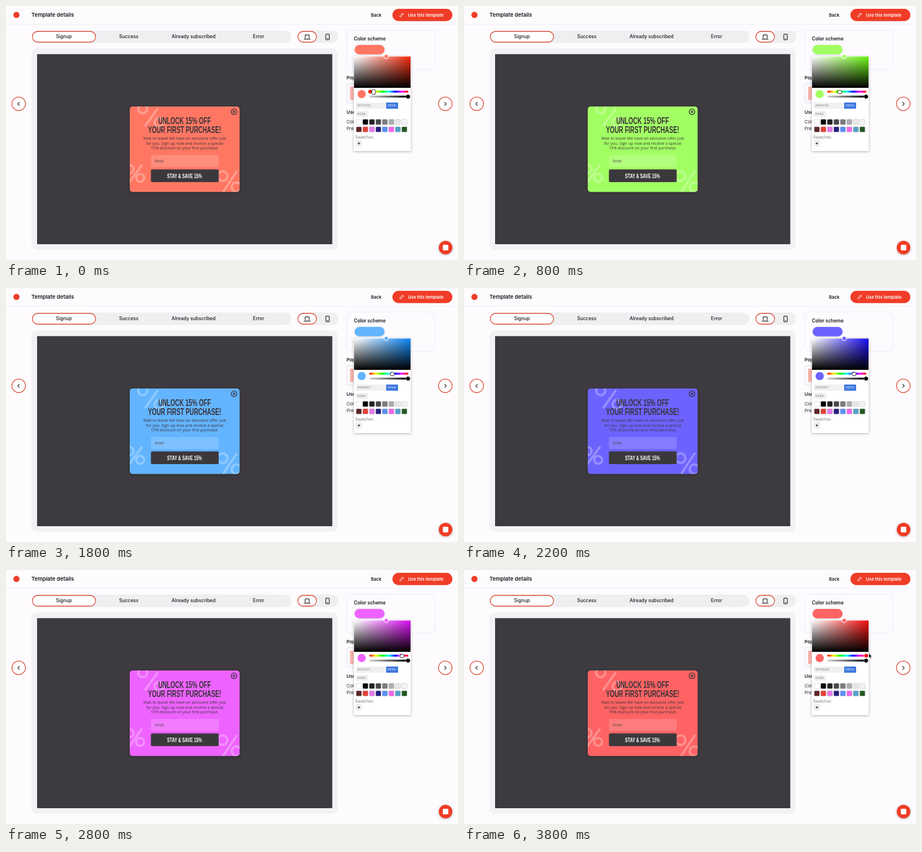
An HTML page for the animation above (3.9 s loop, 800 by 450 pixels).

```html
<!DOCTYPE html>
<html lang="en">
<head>
<meta charset="utf-8">
<title>Template details</title>
<style>
  html, body { margin: 0; width: 100%; height: 100%; overflow: hidden; background: #fdfbfe; }
  svg { display: block; width: 800px; height: 450px; font-family: Inter, sans-serif; --h: 7.4; }
  .tint { fill: hsl(var(--h) 100% 69.5%); }
  .hue { fill: hsl(var(--h) 100% 50%); }
  .hue-stop { stop-color: hsl(var(--h) 90% 50%); }
  .bold { font-weight: 600; fill: #17161a; }
  .tabs { font-size: 8.4px; font-weight: 500; fill: #1b1a1e; text-anchor: middle; }
  .ring { fill: #fff; stroke: #dc4c38; stroke-width: 1.3; }
  .line { fill: none; stroke: #222; stroke-width: 1.2; stroke-linecap: round; stroke-linejoin: round; }
  .condensed { font: bold 16px "Liberation Sans", sans-serif; text-anchor: middle; fill: #373238; }
  .copy { font: 500 7.05px "Open Sans", sans-serif; text-anchor: middle; fill: #3c343a; }
  .tiny { font-size: 4.8px; letter-spacing: .4px; fill: #77757b; }
  .percent { fill: none; stroke: #fff; stroke-opacity: .28; stroke-width: 4; }
  .soft { filter: drop-shadow(0 1px 2px rgba(0, 0, 0, .3)); }
</style>
</head>
<body>
<svg id="stage" viewBox="0 0 800 450">
  <defs>
    <linearGradient id="sat">
      <stop stop-color="#fff"/><stop offset="1" class="hue-stop"/>
    </linearGradient>
    <linearGradient id="dark" x2="0" y2="1">
      <stop stop-color="#000" stop-opacity="0"/><stop offset="1" stop-color="#000"/>
    </linearGradient>
    <linearGradient id="rainbow">
      <stop stop-color="#f00"/><stop offset=".1667" stop-color="#ff0"/>
      <stop offset=".3333" stop-color="#0f0"/><stop offset=".5" stop-color="#0ff"/>
      <stop offset=".6667" stop-color="#00f"/><stop offset=".8333" stop-color="#f0f"/>
      <stop offset="1" stop-color="#f00"/>
    </linearGradient>
    <linearGradient id="alpha">
      <stop stop-color="#d5d5d5"/><stop offset="1" stop-color="#000"/>
    </linearGradient>
    <clipPath id="card"><rect x="219" y="178" width="194.5" height="151.5" rx="5"/></clipPath>
  </defs>

  <rect width="800" height="450" fill="#fdfbfe"/>

  <!-- header -->
  <path d="M0 32.5H800" stroke="#f0eef2"/>
  <circle cx="18.5" cy="15.8" r="5.5" fill="#ef3d2a"/>
  <text class="bold" x="45" y="19.2" font-size="9.5">Template details</text>
  <text class="bold" x="646" y="18.7" font-size="7.7">Back</text>
  <rect x="684" y="5" width="106" height="21.7" rx="10.8" fill="#f03c26"/>
  <path d="M697 19.2l.5-2.2 4.6-4.6 1.7 1.7-4.6 4.6zM701 13.5l1.7 1.7" fill="none" stroke="#fff" stroke-width=".9" stroke-linejoin="round"/>
  <text x="711.5" y="18.6" font-size="7.5" font-weight="600" fill="#fff">Use this template</text>

  <!-- tabs -->
  <g fill="#eeeff1">
    <rect x="46" y="43.5" width="459" height="22" rx="11"/>
    <rect x="516" y="43.5" width="72" height="22" rx="11"/>
  </g>
  <rect class="ring" x="46.6" y="45" width="112" height="19" rx="9.5"/>
  <rect class="ring" x="516.6" y="45" width="33" height="19" rx="9.5"/>
  <g class="tabs">
    <text x="102.5" y="57.4">Signup</text>
    <text x="217.3" y="57.4">Success</text>
    <text x="332" y="57.4">Already subscribed</text>
    <text x="447" y="57.4">Error</text>
  </g>
  <path class="line" d="M529.5 57v-5q0-.8.8-.8h5.4q.8 0 .8.8v5M527.8 58.7h10.4"/>
  <rect class="line" x="566" y="49.8" width="6.2" height="10.2" rx="1.4"/>
  <path class="line" d="M568.5 57.9h1.2"/>

  <!-- preview -->
  <rect x="45" y="75" width="542" height="357" rx="10" fill="#f2f1f4"/>
  <rect x="55" y="85.3" width="522.5" height="336.7" fill="#3d3b3f"/>
  <rect class="tint soft" x="219" y="178" width="194.5" height="151.5" rx="5"/>
  <g class="percent" clip-path="url(#card)">
    <path d="M269 181L246 213M241 281L217 314M409 292L384 330"/>
    <circle cx="242" cy="182" r="8"/><circle cx="271" cy="206" r="8"/>
    <circle cx="219" cy="289" r="7"/><circle cx="237.5" cy="304.5" r="7"/>
    <circle cx="383.5" cy="301.5" r="8.5"/><circle cx="408" cy="321" r="8.5"/>
  </g>
  <g fill="none" stroke="#37333a" stroke-width="1.3" stroke-linecap="round">
    <circle cx="403.6" cy="187.4" r="5"/>
    <path d="M401.9 185.7l3.4 3.4m0-3.4l-3.4 3.4"/>
  </g>
  <g class="condensed">
    <g transform="translate(316 0) scale(.66 1)">
      <text y="209">UNLOCK 15% OFF</text>
      <text y="224.7">YOUR FIRST PURCHASE!</text>
    </g>
  </g>
  <g class="copy">
    <text x="316.3" y="237.3">Wait to leave! We have an exclusive offer just</text>
    <text x="316.3" y="245.7">for you. Sign up now and receive a special</text>
    <text x="316.3" y="254.1">15% discount on your first purchase.</text>
  </g>
  <rect x="256.5" y="264" width="120" height="21.5" rx="2" fill="#fff" fill-opacity=".16"/>
  <text x="263.2" y="277" style="font:6.2px 'Open Sans',sans-serif" fill="#4a4048">Email</text>
  <rect x="256.5" y="289.5" width="120" height="22.5" rx="2.5" fill="#3b383c"/>
  <g class="condensed" transform="translate(316 304.6) scale(.66 1)">
    <text style="font-size:10.8px;fill:#fff">STAY &amp; SAVE 15%</text>
  </g>

  <!-- navigation -->
  <circle class="ring" cx="22.5" cy="173.3" r="12"/>
  <path class="line" d="M23.7 170.4l-2.9 2.9 2.9 2.9"/>
  <circle class="ring" cx="777.5" cy="173.3" r="12"/>
  <path class="line" d="M776.3 170.4l2.9 2.9-2.9 2.9"/>
  <circle class="soft" cx="778" cy="428" r="12" fill="#f03c26"/>
  <rect x="773.2" y="423" width="9.6" height="10" rx="1.6" fill="#fff"/>

  <!-- side panel -->
  <rect x="603" y="42.5" width="156.5" height="69.5" rx="9" fill="none" stroke="#eeecf1"/>
  <text class="bold" x="615.8" y="61" font-size="8.4">Color scheme</text>
  <rect x="616" y="68" width="55" height="18.5" rx="9.2" fill="#fff" stroke="#e4e2e7" stroke-width=".8"/>
  <rect class="tint" x="617" y="69" width="53" height="16.7" rx="8.3"/>
  <text class="bold" x="602.7" y="130.4" font-size="8.2">Popup type</text>
  <rect x="603" y="137.5" width="40" height="34.5" rx="3" fill="#faf8fb" stroke="#e3e1e6"/>
  <rect x="609" y="143" width="28" height="23.5" fill="#f7b3ab"/>
  <text class="bold" x="602.7" y="191.2" font-size="8.2">Use case</text>
  <g font-size="8" fill="#29272c">
    <text x="602.7" y="208">Color themes</text>
    <text x="602.7" y="220">Prevent exits</text>
  </g>

  <!-- picker -->
  <rect class="soft" x="615.5" y="89" width="101" height="168" rx="1" fill="#fff"/>
  <rect x="616" y="89.5" width="100" height="55.5" fill="url(#sat)"/>
  <rect x="616" y="89.5" width="100" height="55.5" fill="url(#dark)"/>
  <circle class="tint" cx="673" cy="89.5" r="3.8" stroke="#fff" stroke-width="1.2"/>
  <circle class="tint" cx="629.5" cy="156" r="7.3"/>
  <rect x="643" y="150" width="69.3" height="3.6" rx="1.8" fill="url(#rainbow)"/>
  <rect x="643" y="158.7" width="69.3" height="3.6" rx="1.8" fill="url(#alpha)"/>
  <circle cx="711.6" cy="160.5" r="3.8" stroke="#fff" stroke-width=".5"/>
  <g fill="#f0f0f2">
    <rect x="619.5" y="171" width="51.5" height="11" rx="1"/>
    <rect x="619.5" y="186" width="21.5" height="10.5" rx="1"/>
  </g>
  <rect x="672.7" y="171" width="21.3" height="11" rx="1" fill="#3f78e0"/>
  <g class="tiny">
    <text id="hex" x="622" y="178.3">#FF7F6D</text>
    <text x="675.6" y="178.3" style="fill:#fff">HEXA</text>
    <text x="622" y="193">RGBA</text>
  </g>
  <g id="swatches" stroke="#bbb" stroke-width=".5"></g>
  <text x="618" y="235.4" font-size="6.9" fill="#77757b">Swatches</text>
  <rect x="619.8" y="238.6" width="9.6" height="9.6" rx="1.5" fill="#f4f4f5" stroke="#ccc" stroke-width=".6"/>
  <path d="M622.3 243.4h4.6m-2.3-2.3v4.6" stroke="#222"/>

  <!-- slider knob and pointers -->
  <circle id="knob" class="hue" cy="151.8" r="3.8" stroke="#fff" stroke-width="1.2"/>
  <g fill="#fff" stroke="#111" stroke-width=".9" stroke-linejoin="round">
    <path id="open" d="M-1.8 4.6L-4.2 1.2Q-4.4 0-3.2.2L-2.3 1-3-2.6Q-2.6-3.8-1.8-2.8L-1.2-4Q-.3-4.9.3-3.9L1.3-4.1Q2.2-4.1 2.3-3L3.3-3Q4.2-2.6 4 .6L2.7 4.6Z"/>
    <path id="closed" d="M-1.8 3.4L-3.6 1.1Q-4-.6-2.6-.8V-1.8Q-2-3-1-2.4 0-3.3.8-2.4 1.8-2.9 2.4-1.9 3.8-1.9 3.7-.2 3.7 1.6 2.6 3.4Z"/>
    <path id="arrow" d="M716.3 147.6v8.2l1.9-1.7 1.3 2.9 1.5-.7-1.3-2.8h2.5z" fill="#111" stroke="#fff" stroke-width=".5"/>
  </g>
</svg>
<script>
  const LOOP = 3900, STEP = 100, RELEASE = 3600;
  const SAT = 146 / 255;
  const keys = [[0, 7.4], [800, 95.8], [1300, 152], [1800, 208.8], [2200, 243.3], [2800, 293.4], [3500, 360], [LOOP, 360]];
  const $ = id => document.getElementById(id);
  const stage = $("stage"), hex = $("hex"), knob = $("knob");

  const colors = "#fff #000 #222226 #48474b #7b7a7e #acabaf #e8e7ea #f3f2f5 " +
    "#5c2524 #e24035 #e47bea #24207d #5a90f6 #f067e8 #55a0c9 #235822";
  $("swatches").innerHTML = colors.split(" ").map((c, i) =>
    `<rect x="${619.9 + i % 8 * 11.5}" y="${i < 8 ? 200.8 : 213.9}" width="9.4" height="9.4" rx="1.5" fill="${c}"/>`).join("");

  function hueAt(t) {
    const i = keys.findIndex(k => k[0] > t);
    const [t0, h0] = keys[i - 1], [t1, h1] = keys[i];
    return h0 + (h1 - h0) * (t - t0) / (t1 - t0);
  }

  function toHex(h) {
    const channel = n => {
      const k = (n + h / 60) % 6;
      const v = 1 - SAT * Math.max(0, Math.min(k, 4 - k, 1));
      return Math.round(v * 255).toString(16).padStart(2, "0");
    };
    return "#" + [5, 3, 1].map(channel).join("").toUpperCase();
  }

  function show(id, on) {
    $(id).style.display = on ? "" : "none";
  }

  function draw(now) {
    const t = Math.floor(now % LOOP / STEP) * STEP;
    const h = hueAt(t), x = 643 + h / 360 * 68.8;
    stage.style.setProperty("--h", h);
    hex.textContent = toHex(h);
    knob.setAttribute("cx", x);
    const hand = Math.max(x, 700 + (t - 2800) * .018) + .7;
    for (const id of ["open", "closed"]) $(id).setAttribute("transform", `translate(${hand} 152)`);
    show("open", t < STEP);
    show("closed", t >= STEP && t < RELEASE);
    show("arrow", t >= RELEASE);
  }

  const start = performance.now();
  function tick() {
    draw(performance.now() - start);
    requestAnimationFrame(tick);
  }
  draw(0);
  requestAnimationFrame(tick);
</script>
</body>
</html>
```
